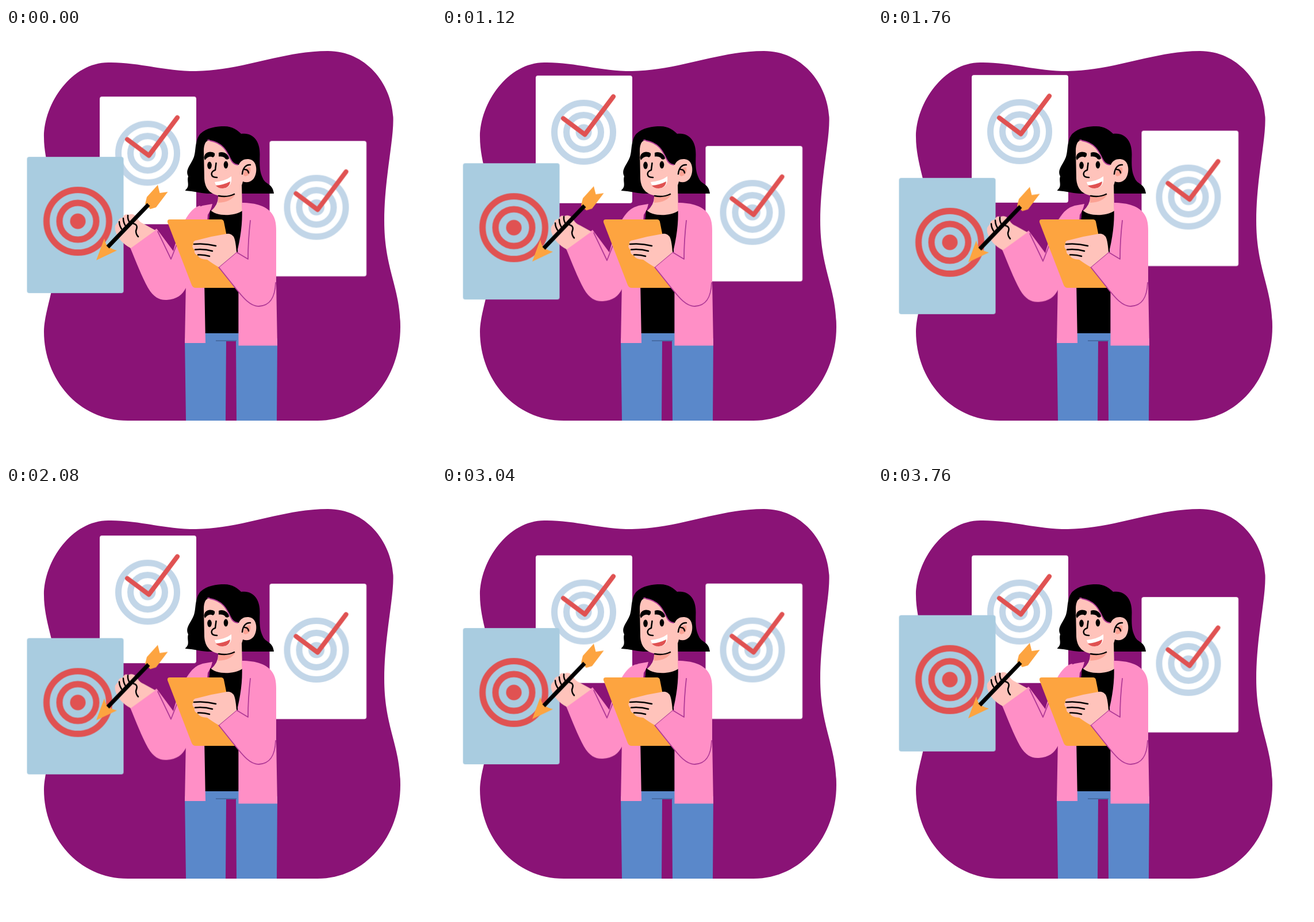
These frames come from a looping animation (748 by 748 pixels, 3840 ms). An HTML page:

```html
<!DOCTYPE html>
<html lang="en">
<head>
<meta charset="utf-8">
<title>Goals on target</title>
<style>
html, body { margin: 0; width: 100%; height: 100%; overflow: hidden; background: #fff; }
svg { display: block; width: 100vw; height: 100vh; }

.card, .arm { animation: 3840ms infinite; }
.done-left { animation-name: done-left; animation-delay: -253ms; animation-timing-function: cubic-bezier(.4, 0, .4, 1); }
.done-right { animation-name: done-right; animation-delay: -3000ms; animation-timing-function: ease-in-out; }
.current { animation-name: current; animation-delay: -3232ms; animation-timing-function: cubic-bezier(.4, 0, .4, 1); }
.arm { animation-name: arm; animation-timing-function: cubic-bezier(.37, 0, .63, 1); }

@keyframes done-left {
  0%, 92.3%, 100% { transform: translate(163px, 121.8px); }
  42.2%, 52.6% { transform: translate(163px, 81.8px); }
}
@keyframes done-right {
  0%, 93.5%, 100% { transform: translate(458.5px, 208.5px); }
  36.5%, 53.3% { transform: translate(458.5px, 168.9px); }
}
@keyframes current {
  0%, 88.1%, 100% { transform: translate(36.5px, 223.8px); }
  42.5%, 47.4% { transform: translate(36.5px, 265px); }
}
@keyframes arm {
  0%, 100% { transform: translateY(0); }
  50% { transform: translateY(3.5px); }
}

.skin { fill: #ffc3bb; }
.blush { fill: #fba294; }
.pink { fill: #ff8fc6; }
.gold { fill: #fda440; }
.red { fill: #e05252; }
.line, .seam { fill: none; stroke-linecap: round; stroke-linejoin: round; }
.line { stroke: #000; stroke-width: 2.5; }
.seam { stroke: #b03a96; stroke-width: 1.8; }
</style>
</head>
<body>
<svg viewBox="0 0 748 748">
  <defs>
    <g id="goal">
      <g fill="none" stroke="#c2d6e8" stroke-width="11">
        <circle r="51"/>
        <circle r="30"/>
      </g>
      <circle r="14" fill="#c2d6e8"/>
      <path d="M-35.5-24 2 4 51.500-62" fill="none" stroke="#e05252" stroke-width="8" stroke-linecap="round" stroke-linejoin="round"/>
    </g>
  </defs>

  <path fill="#8a1376" d="M66 190C66 130 115 60 178 60C228 59 275 75 330 75C412 74 480 40 560 40C625 40 670 95 673.500 155C675 195 658 262 658 335C658 420 686 450 686 520C686 610 625 683 542 683H212C125 683 66 610 66 528C66 490 92 440 92 350C92 290 66 240 66 190Z"/>

  <g class="card done-left">
    <rect width="168" height="222" rx="4" fill="#fff"/>
    <use href="#goal" x="83.500" y="98.500"/>
  </g>
  <g class="card done-right">
    <rect width="168.500" height="235.500" rx="4" fill="#fff"/>
    <use href="#goal" x="81.500" y="115.500"/>
  </g>
  <g class="card current">
    <rect width="168" height="237" rx="4" fill="#a9cce0"/>
    <g transform="translate(88.500 112)" fill="none" stroke="#e05252" stroke-width="11">
      <circle r="54.500"/>
      <circle r="32"/>
      <circle r="13.500" class="red" stroke="none"/>
    </g>
  </g>

  <!-- hair and head -->
  <path d="M312 282C321 275 314 267 317 258C311 246 322 238 327 224C331 212 328 196 338 184C350 173 366 171 380 171C394 171 403 178 409 184C430 181 442 197 441.500 220C441 240 441 250 447 262C452 273 464 270 466 288H350C336 287 328 284 312 283Z"/>
  <path class="skin" d="M369 270H410L411 318C400 330 366 330 356 319Q369 308 369 294Z"/>
  <path class="blush" d="M369 292Q386 297 399 289Q392 303 369 304Z"/>
  <path class="skin" d="M344 214C344 200 349 194 355 196C377 200 384 214 390 227Q395 238 405 238C409 228 420 226 428 230C438 236 437 255 430 263Q422 271 412 267C408 286 393 292 376 292C356 291 346 280 345 262Z"/>
  <path class="seam" d="M351 195Q353 194 355 196C377 200 384 214 390 227Q395 238 403 238"/>
  <path class="line" d="M370 292Q385 295 397 289"/>
  <path class="blush" d="M413 256C414 246 419 241 425 243Q427 256 416 258Z"/>
  <path class="line" d="M411 254C412 243 418 237 425 238M415 246Q421 246 422 252"/>
  <path d="M344.500 226C345 216 355 213 363 218Q364 223 360 225C354 222 350 225 346 230Z"/>
  <path d="M370 217C378 214 387 219 388 227Q386 230 382 228C379 223 375 224 370 223.500Z"/>
  <ellipse cx="354" cy="239" rx="3.800" ry="6.500"/>
  <ellipse cx="382.500" cy="238" rx="3.800" ry="6.500"/>
  <path class="line" d="M365.500 235L364 247C355 250 355 260 367 260"/>
  <path fill="#fff" d="M363 268Q382 266 392 258Q394 278 377 279Q365 278 363 268Z"/>
  <path class="red" d="M365 274Q378 273 390 267Q389 278 377 279Q369 279 365 274Z"/>

  <!-- trousers, shirt and jacket -->
  <path fill="#5a88ca" d="M311 540H340V528H408V540H472L471 683H401L400 545H383L382 683H313Z"/>
  <path d="M365 544H401" stroke="#35517f"/>
  <path d="M355 316C365 328 396 328 411 318V400L404.500 450V531H346L344 440Z"/>
  <path class="pink" d="M359 306Q357 316 351 325L349 350L345 440L347 548H311L313 440L300 370L320 325Q328 313 342 309Z"/>
  <path class="pink" d="M410 304C435 304 455 310 464 325C471 336 470 350 470 365V440L472 552.500H404.500V440L403 385C410 355 412 330 410 304Z"/>

  <!-- pointing arm with arrow -->
  <g class="arm">
    <path class="pink" d="M338 309C318 313 303 345 291 388L262 349L216 382C226 406 236 432 247 452C257 469 268 474 280 473C297 472 307 464 313 452L335 400Z"/>
    <path class="seam" d="M264 354L287 402L298 374"/>
    <path class="skin" d="M217 383Q196 372 190 352Q188 342 195 338Q195 330 203 330Q206 322 213 325Q222 321 228 330Q232 338 240 341L260 352Z"/>
    <path class="line" d="M197 337Q197 345 203 352M204 331Q204 340 210 347M212 326Q211 334 217 341"/>
    <path class="gold" d="M264 273L267.500 287L281.500 285L261 312L251 315L242 306L245 294Z"/>
    <path class="gold" d="M171 366Q173 377 178 380Q184 385 193 387L157 404Z"/>
    <path d="M248 307L177 381" stroke="#000" stroke-width="7"/>
    <path class="line" d="M221 340C230 342 228 348 226 353Q226 359 230 363"/>
  </g>

  <!-- clipboard and holding arm -->
  <path class="gold" d="M285 333H374Q378 333 379 337L402 452H330Q325 452 323 447L281 338Q280 333 285 333Z"/>
  <path class="pink" d="M370 416L401 390L424 403L469 400V440C469 470 460 485 440 485C423 485 408 463 398 451Z"/>
  <path class="seam" d="M425 335Q421 370 421 402L401 390L370 416L398 451C408 463 423 485 440 484C460 483 468 468 469 443"/>
  <path class="skin" d="M384 358Q358 362 333 369Q324 370 326 376Q322 381 328 386Q326 393 334 396Q336 402 350 403Q361 411 370 416L401 390Q399 365 395 362Q390 357 384 358Z"/>
  <path class="line" d="M327 376Q346 374 365 379M329 385.500Q345 384 359 388M334 394.500Q345 394 354 397"/>
</svg>
</body>
</html>
```
